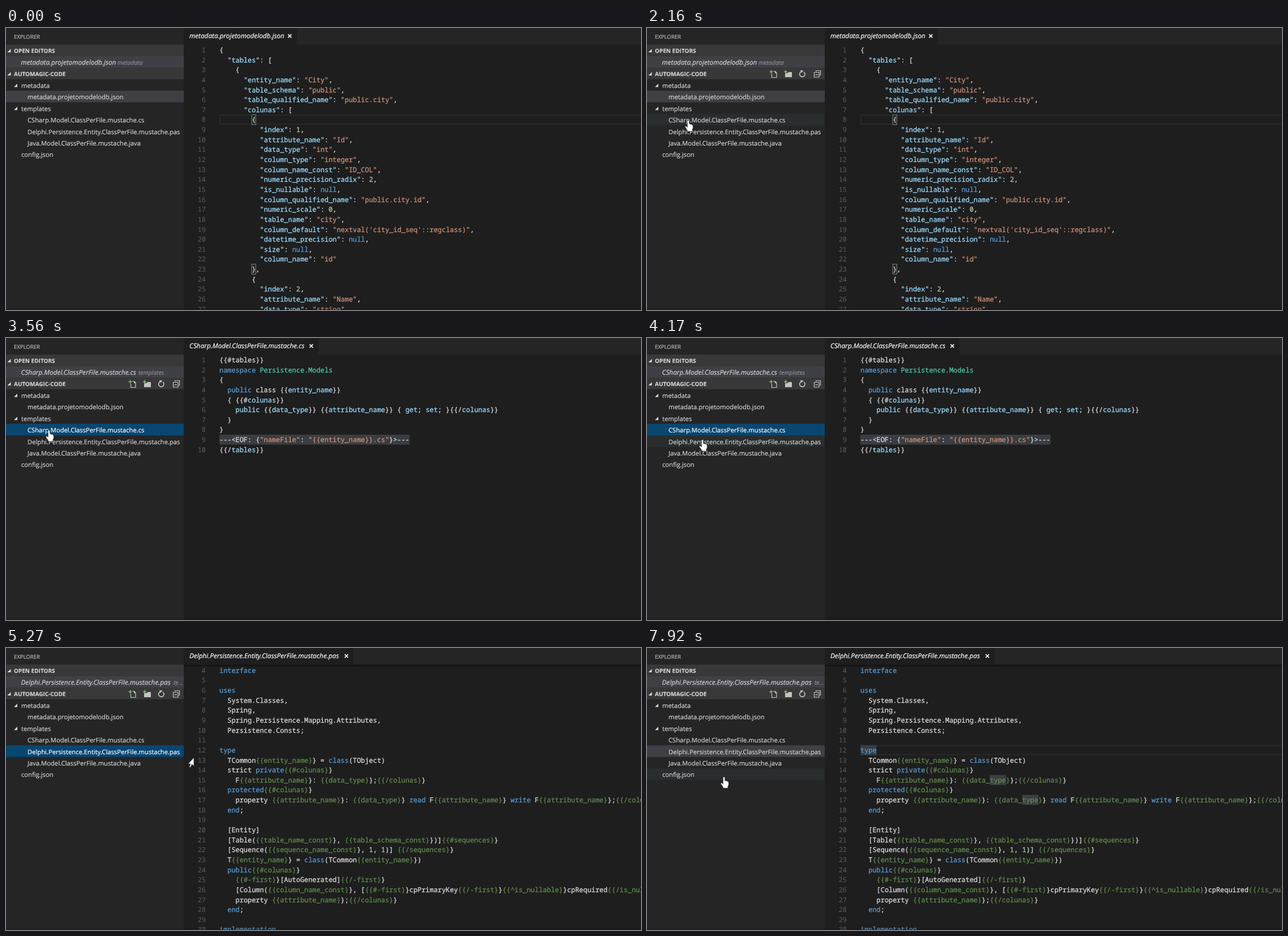
An HTML page that plays this animation: 1122x499 px, repeating every 8 s.

```html
<!DOCTYPE html>
<html lang="en">
<head>
<meta charset="utf-8">
<title>Code editor</title>
<style>
html, body { margin: 0; width: 100%; height: 100%; overflow: hidden; background: #1e1e1e; }
svg { display: block; }
text { white-space: pre; text-rendering: geometricPrecision; color: #dcdcdc; }
text, tspan { fill: currentColor; stroke: currentColor; stroke-width: .28px; }
.code { font: 11.917px "Noto Sans Mono", "DejaVu Sans Mono", monospace; }
.num { color: #5a5a5a; text-anchor: end; stroke-width: .1px; }
.ui { font: 11.22px "Open Sans", "Noto Sans", sans-serif; color: #d2d2d2; stroke-width: .2px; }
.title { font-size: 9.55px; color: #bbb; }
.head { font-size: 10px; font-weight: 700; }
.it { font-size: 11.8px; font-style: italic; }
.tab { color: #fff; }
.dim { font-size: 10.4px; font-style: italic; color: #8f8d92; }
.key { color: #9cdcfe; } .str { color: #ce9178; } .kw { color: #569cd6; }
.lit { color: #b5cea8; } .type { color: #4ec9b0; } .com { color: #608b4e; }
</style>
</head>
<body>
<script>
const LOOP = 8000, CH = 7.15, LH = 17.64, X0 = 377, ROW = 20.43, TREE = 90.6;

function el(tag, attrs, parent, text) {
  const n = document.createElementNS('http://www.w3.org/2000/svg', tag);
  for (const k in attrs) n.setAttribute(k, attrs[k]);
  if (text !== undefined) n.textContent = text;
  if (parent) parent.append(n);
  return n;
}
const group = p => el('g', {}, p);
const rect = (p, x, y, width, height, fill) => el('rect', { x, y, width, height, fill }, p);
const label = (p, x, y, cls, text) => el('text', { x, y: Math.round(y), class: 'ui ' + cls }, p, text);
const path = (p, d, fill, stroke, w = 1) => el('path', { d, fill, stroke, 'stroke-width': w }, p);
const show = (n, on) => n.setAttribute('display', on ? 'inline' : 'none');
const at = (table, t) => table.reduce((a, r) => r[0] <= t ? r : a);

const JSON_SRC = `{
  "tables": [
    {
      "entity_name": "City",
      "table_schema": "public",
      "table_qualified_name": "public.city",
      "colunas": [
        {
          "index": 1,
          "attribute_name": "Id",
          "data_type": "int",
          "column_type": "integer",
          "column_name_const": "ID_COL",
          "numeric_precision_radix": 2,
          "is_nullable": null,
          "column_qualified_name": "public.city.id",
          "numeric_scale": 0,
          "table_name": "city",
          "column_default": "nextval('city_id_seq'::regclass)",
          "datetime_precision": null,
          "size": null,
          "column_name": "id"
        },
        {
          "index": 2,
          "attribute_name": "Name",
          "data_type": "string",`;
const CS_SRC = `{{#tables}}
namespace Persistence.Models
{
  public class {{entity_name}}
  { {{#colunas}}
    public {{data_type}} {{attribute_name}} { get; set; }{{/colunas}}
  }
}
---<EOF: {"nameFile": "{{entity_name}}.cs"}>---
{{/tables}}`;
const PAS_SRC = `interface

uses
  System.Classes,
  Spring,
  Spring.Persistence.Mapping.Attributes,
  Persistence.Consts;

type
  TCommon{{entity_name}} = class(TObject)
  strict private{{#colunas}}
    F{{attribute_name}}: {{data_type}};{{/colunas}}
  protected{{#colunas}}
    property {{attribute_name}}: {{data_type}} read F{{attribute_name}} write F{{attribute_name}};{{/colunas}}
  end;

  [Entity]
  [Table({{table_name_const}}, {{table_schema_const}})]{{#sequences}}
  [Sequence({{sequence_name_const}}, 1, 1)] {{/sequences}}
  T{{entity_name}} = class(TCommon{{entity_name}})
  public{{#colunas}}
    {{#-first}}[AutoGenerated]{{/-first}}
    [Column({{column_name_const}}, [{{#-first}}cpPrimaryKey{{/-first}}{{^is_nullable}}cpRequired{{/is_nullable}}
    property {{attribute_name}};{{/colunas}}
  end;

implementation`;

const FILES = [
  { name: 'metadata.projetomodelodb.json', dir: 'metadata', dirX: 197, tab: 200, src: JSON_SRC, first: 1, mid: 38.7,
    rule: /(?<key>"[^"]*"(?=:))|(?<str>"[^"]*")|(?<kw>null)|(?<lit>\d+)/g },
  { name: 'CSharp.Model.ClassPerFile.mustache.cs', dir: 'templates', dirX: 234, tab: 238, src: CS_SRC, first: 1, mid: 38.7,
    rule: /(?<str>"[^"]*")|(?<kw>namespace|public(?= class))|(?<type>Persistence\.Models)|(?<key>\b(?:entity_name|colunas|data_type|attribute_name|(?<=\/)tables|get|set|public)\b)/g },
  { name: 'Delphi.Persistence.Entity.ClassPerFile.mustache.pas', dir: 'te...', dirX: 296, tab: 300, src: PAS_SRC, first: 4, mid: 39.5,
    rule: /(?<com>\{[^}]*\})|(?<kw>\b(?:interface|uses|type|class|private|protected|public|end|read|write|implementation)\b)|(?<lit>\b\d+\b)/g },
];

const svg = el('svg', { width: 1122, height: 499, viewBox: '0 0 1122 499' }, document.body);
rect(svg, 0, 0, 1122, 499, '#1e1e1e');

// Editor pane
const lineTop = (f, n) => f.mid + (n - f.first) * LH - LH / 2;
function lineFrame(p, f, n) {
  const box = rect(p, X0 + .9, lineTop(f, n) + .9, 800, LH - 1.8, 'none');
  box.setAttribute('stroke', '#2a2a2a');
  box.setAttribute('stroke-width', 1.8);
}
function mark(p, f, n, col, len, fill) {
  return rect(p, X0 + col * CH, lineTop(f, n), len * CH, LH, fill);
}
function writeLine(p, f, text, i) {
  const y = Math.round(f.mid + i * LH + 4.3);
  el('text', { x: 353, y, class: 'code num' }, p, f.first + i);
  const body = text.trimStart();
  const line = el('text', { x: X0 + (text.length - body.length) * CH, y, class: 'code' }, p);
  let pos = 0;
  for (const m of body.matchAll(f.rule)) {
    if (m.index > pos) el('tspan', {}, line, body.slice(pos, m.index));
    const cls = Object.keys(m.groups).find(k => m.groups[k] !== undefined);
    el('tspan', { class: cls }, line, m[0]);
    pos = m.index + m[0].length;
  }
  if (pos < body.length) el('tspan', {}, line, body.slice(pos));
}
for (const f of FILES) {
  f.view = group(svg);
  f.under = group(f.view);
  f.src.split('\n').forEach((s, i) => writeLine(f.view, f, s, i));
}
const [json, cs, pas] = FILES;
lineFrame(json.under, json, 8);
for (const n of [8, 23]) {
  const box = mark(json.under, json, n, 8, 1, '#1c251c');
  box.setAttribute('stroke', '#888');
}
mark(cs.under, cs, 9, 0, 47, '#3a3d41');
const current = group(pas.under), words = group(pas.under);
lineFrame(current, pas, 12);
mark(words, pas, 12, 0, 4, '#343f47');
mark(words, pas, 15, 32, 4, '#3b3f45');
mark(words, pas, 17, 40, 4, '#3b3f45');
const caret = rect(pas.view, 406, 172, 2, 17.5, '#d4d4d4');

// Scroll shadow under the tab bar
const fade = el('linearGradient', { id: 'fade', x2: 0, y2: 1 }, svg);
el('stop', { offset: 0, 'stop-color': '#000', 'stop-opacity': .55 }, fade);
el('stop', { offset: 1, 'stop-color': '#000', 'stop-opacity': 0 }, fade);
rect(pas.view, 314, 29.5, 808, 4, 'url(#fade)');

// Tabs
rect(svg, 314, 0, 808, 29.5, '#252526');
for (const f of FILES) {
  f.tabView = group(svg);
  rect(f.tabView, 314, 0, f.tab, 29.5, '#1e1e1e');
  label(f.tabView, 324, 18.3, 'it tab', f.name);
  const x = 314 + f.tab - 12.6;
  path(f.tabView, `M${x - 3} 11.2l6 6m0-6l-6 6`, 'none', '#eee', 1.8);
}

// Sidebar
rect(svg, 0, 0, 314, 499, '#252526');
rect(svg, 0, TREE - 3 * ROW, 314, ROW, '#383838');
rect(svg, 0, TREE - 2 * ROW, 314, ROW, '#3f3f46');
rect(svg, 0, TREE - ROW, 314, ROW, '#383838');
const hover = rect(svg, 0, 0, 314, ROW, '#2a2d2e');
const picked = rect(svg, 0, 0, 314, ROW, '#3f3f46');
const arrowhead = (x, y) => path(svg, `M${x} ${y}v6h-6z`, '#d8d8d8');
label(svg, 14, 18.5, 'title', 'EXPLORER');
label(svg, 14, 43.8, 'head', 'OPEN EDITORS');
label(svg, 14, 84.6, 'head', 'AUTOMAGIC-CODE');
arrowhead(8.5, 37);
arrowhead(8.5, 78);
for (const f of FILES) {
  f.openView = group(svg);
  label(f.openView, 26.5, 65, 'it', f.name);
  label(f.openView, f.dirX, 65, 'dim', f.dir);
}
const rows = [
  [27, 'metadata'], [38, json.name], [27, 'templates'], [38, cs.name], [38, pas.name],
  [38, 'Java.Model.ClassPerFile.mustache.java'], [27, 'config.json'],
].map(([x, s], i) => {
  if (i === 0 || i === 2) arrowhead(20, 98.5 + i * ROW);
  return label(svg, x, 105.8 + i * ROW, '', s);
});

const icons = group(svg);
path(icons, 'M220.5 81v6.5h8.5v-8.5l-2.5-2.5h-3M226.5 76.5v3h3', 'none', '#c5c5c5', 1.2);
path(icons, 'M244 80h4l2-2h6v9h-12z', '#c5c5c5');
path(icons, 'M216.5 77.5h6m-3-3v6M242 77.5h6m-3-3v6', 'none', '#7fc26a', 1.6);
path(icons, 'M272 77.6a4.7 4.7 0 1 0 5 .2', 'none', '#c5c5c5', 1.6);
path(icons, 'M271 74.5l5.5 1-4 4z', '#c5c5c5');
path(icons, 'M298.5 77v-1.5h8v8h-1.5M295.5 78.5h8.5v8.5h-8.5zM297.5 82.7h4.5', 'none', '#c5c5c5', 1.2);

rect(svg, 0, 496, 1122, 3, 'rgba(0,0,0,.15)');

// Mouse pointers, drawn around their hot spot
const ARROW = 'M0 0V15L3.5 11.8 6 17.5 8.2 16.5 5.8 11H10.3Z';
const pointers = {
  hand: path(svg, 'M-1.7 1.7Q-1.7 0 0 0Q1.7 0 1.7 1.7V6.5L6.5 7.8Q8.3 8.5 8.3 10.5V14L7 17V20H-1.7V18L-5.5 12.5Q-6 10.3-4 10.6L-1.7 12.5Z', '#fff', '#222', .7),
  arrow: path(svg, ARROW, '#fff', '#222', .7),
  flip: path(svg, ARROW, '#fff', '#222', .7),
  beam: path(svg, 'M-3-7.5H-1L0-6.5 1-7.5H3M0-6.5V6.5M-3 7.5H-1L0 6.5 1 7.5H3', 'none', '#e4e4e4', 1.1),
};

// time, pointer, x, y
const MOUSE = [
  [0, '', 0, 0],
  [380, 'beam', 954, 467], [440, 'beam', 954, 455],
  [680, 'beam', 800, 372], [760, 'beam', 660, 326], [830, 'beam', 620, 339],
  [990, 'beam', 480, 300], [1070, 'beam', 352, 262], [1150, 'arrow', 250, 246],
  [1380, 'hand', 190, 218], [1460, 'hand', 120, 165], [1550, 'hand', 88, 143],
  [1700, 'hand', 84, 147], [1780, 'hand', 80, 152], [1860, 'hand', 78, 155],
  [2010, 'hand', 76, 158], [2090, 'hand', 74, 161], [2160, 'hand', 73, 163],
  [3250, 'hand', 73, 162],
  [3560, 'hand', 76, 163], [3640, 'hand', 79, 165], [3720, 'hand', 82, 168],
  [3800, 'hand', 85, 171], [3870, 'hand', 88, 174], [3950, 'hand', 91, 176],
  [4020, 'hand', 94, 178], [4090, 'hand', 96, 179], [4170, 'hand', 98, 180],
  [4570, 'hand', 99, 181], [4640, 'hand', 100, 182], [4720, 'hand', 101, 183],
  [5200, 'hand', 160, 186], [5270, 'flip', 332, 194],
  [5360, 'beam', 420, 290], [5430, 'beam', 465, 388],
  [5590, 'beam', 390, 300], [5650, 'flip', 340, 160], [5720, 'beam', 372, 80],
  [5780, 'beam', 430, 120], [5840, 'beam', 465, 164], [5900, 'beam', 477, 180],
  [6830, 'beam', 460, 192], [6910, 'beam', 440, 208], [6990, 'beam', 425, 219], [7070, 'beam', 418, 223],
  [7530, 'beam', 350, 232], [7610, 'arrow', 260, 236], [7690, 'arrow', 195, 236],
  [7770, 'hand', 160, 232], [7850, 'hand', 143, 229], [7920, 'hand', 136, 228],
];
// time, open file, tab, editor (-1 while loading), tree row, tree focused
const STATE = [
  [0, 0, 0, 0, 1, false],
  [2790, 1, 0, -1, 3, true],
  [2860, 1, 1, 1, 3, true],
  [4870, 2, 2, -1, 4, true],
  [5200, 2, 2, 2, 4, true],
  [6360, 2, 2, 2, 4, false],
];
const CARET = [[0, false], [6360, true], [6830, false], [7300, true], [7770, false]];

function draw(t) {
  const [, open, tab, editor, row, focused] = at(STATE, t);
  FILES.forEach((f, i) => {
    show(f.view, i === editor);
    show(f.tabView, i === tab);
    show(f.openView, i === open);
  });
  picked.setAttribute('y', TREE + row * ROW);
  picked.setAttribute('fill', focused ? '#094771' : '#3f3f46');
  rows.forEach((r, i) => r.style.color = focused && i === row ? '#fff' : '');

  const [, kind, x, y] = at(MOUSE, t);
  for (const k in pointers) show(pointers[k], k === kind);
  if (kind) {
    const d = kind === 'beam' ? .5 : 0;
    pointers[kind].setAttribute('transform', `translate(${x + d} ${y + d})` + (kind === 'flip' ? ' scale(-1 1)' : ''));
  }
  show(icons, kind && kind !== 'beam' && x < 335);
  show(hover, kind === 'hand');
  hover.setAttribute('y', TREE + Math.floor((y - TREE) / ROW) * ROW);

  show(current, t >= 6360);
  show(words, t >= 6670);
  show(caret, at(CARET, t)[1]);
}

const start = performance.now();
function tick() {
  draw((performance.now() - start) % LOOP);
  requestAnimationFrame(tick);
}
tick();
</script>
</body>
</html>
```
